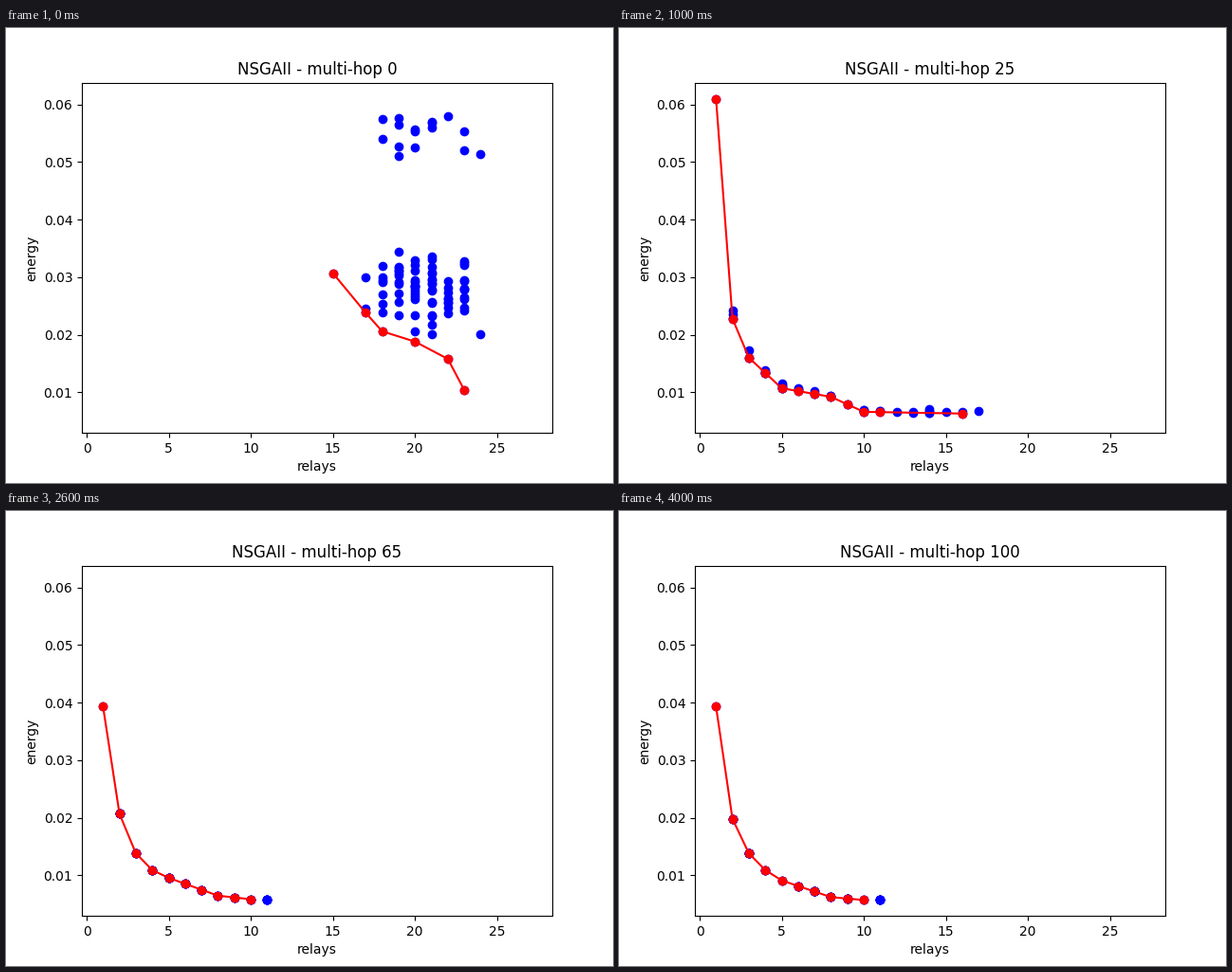
These frames come from a looping animation (640 by 480 pixels, 4200 ms). A matplotlib script:

```python
import numpy as np
import matplotlib.pyplot as plt
from matplotlib.animation import FuncAnimation

FRAMES, INTERVAL, GENS_PER_FRAME = 21, 200, 5
UNIT = 1e-4  # energies below are in units of 1e-4
DENSE_UP_TO = 11  # the front has a member at every relay count up to here

# Corners (relays, energy) of the Pareto front at key generations
KEY_FRONTS = {
    0: [(15, 307), (17, 238), (18, 206), (20, 188), (22, 158), (22, 158), (23, 104)],
    15: [(3, 251), (4, 238), (5, 152), (8, 112), (11, 98), (12, 79), (16, 71)],
    25: [(1, 610), (2, 228), (3, 160), (5, 107), (8, 92), (10, 66), (16, 63)],
    45: [(1, 393), (2, 212), (3, 138), (4, 109), (5, 98), (8, 66), (10, 59)],
    100: [(1, 393), (2, 198), (3, 138), (4, 109), (5, 91), (8, 62), (10, 57)],
}


def front_at(gen):
    """Move the corners between key generations, then fill in the members."""
    keys = list(KEY_FRONTS)
    corners = np.array(list(KEY_FRONTS.values()), float).reshape(len(keys), -1)
    now = np.array([np.interp(gen, keys, track) for track in corners.T]).reshape(-1, 2)
    corner_x = np.rint(now[:, 0])
    xs = np.arange(corner_x[0], corner_x[-1] + 1)
    xs = xs[(xs <= DENSE_UP_TO) | np.isin(xs, corner_x)]
    return xs, np.interp(xs, corner_x, now[:, 1])


def first_population(rng):
    """A broad main cluster and a thin band of costly individuals."""
    main, costly = 75, 16
    xs = np.rint(rng.normal(20.4, 1.7, main + costly)).clip(17, 24)
    es = np.append(rng.normal(282, 34, main), rng.uniform(500, 580, costly))
    return xs, es


def later_population(rng, gen, front):
    """Individuals above the front, closing in on it, with one late mutation burst."""
    burst = np.exp(-((gen - 85) / 5) ** 2)
    spread = 0.4 * np.exp(-gen / 10) + 0.04 * burst
    xs = rng.integers(front[0][0] + 1, front[0][-1] + 2, 40)
    return xs, np.interp(xs, *front) * (1 + rng.exponential(spread, xs.size))


def population_at(gen, front):
    rng = np.random.default_rng(gen)
    xs, es = later_population(rng, gen, front) if gen else first_population(rng)
    es = np.maximum(es, np.interp(xs, *front))
    return np.append(front[0], xs), np.append(front[1], es)


fig, ax = plt.subplots(figsize=(6.4, 4.8), dpi=100)
ax.set(xlim=(-0.29, 28.364), ylim=(0.00293, 0.06381), xlabel="relays", ylabel="energy")
population, = ax.plot([], [], "bo")
pareto, = ax.plot([], [], "r-o")
title = ax.set_title("")


def draw(frame):
    gen = frame * GENS_PER_FRAME
    front = front_at(gen)
    for artist, (xs, es) in ((population, population_at(gen, front)), (pareto, front)):
        artist.set_data(xs, es * UNIT)
    title.set_text(f"NSGAII - multi-hop {gen}")
    return population, pareto, title


anim = FuncAnimation(fig, draw, frames=FRAMES, interval=INTERVAL, repeat=True, repeat_delay=0)
plt.show()
```
